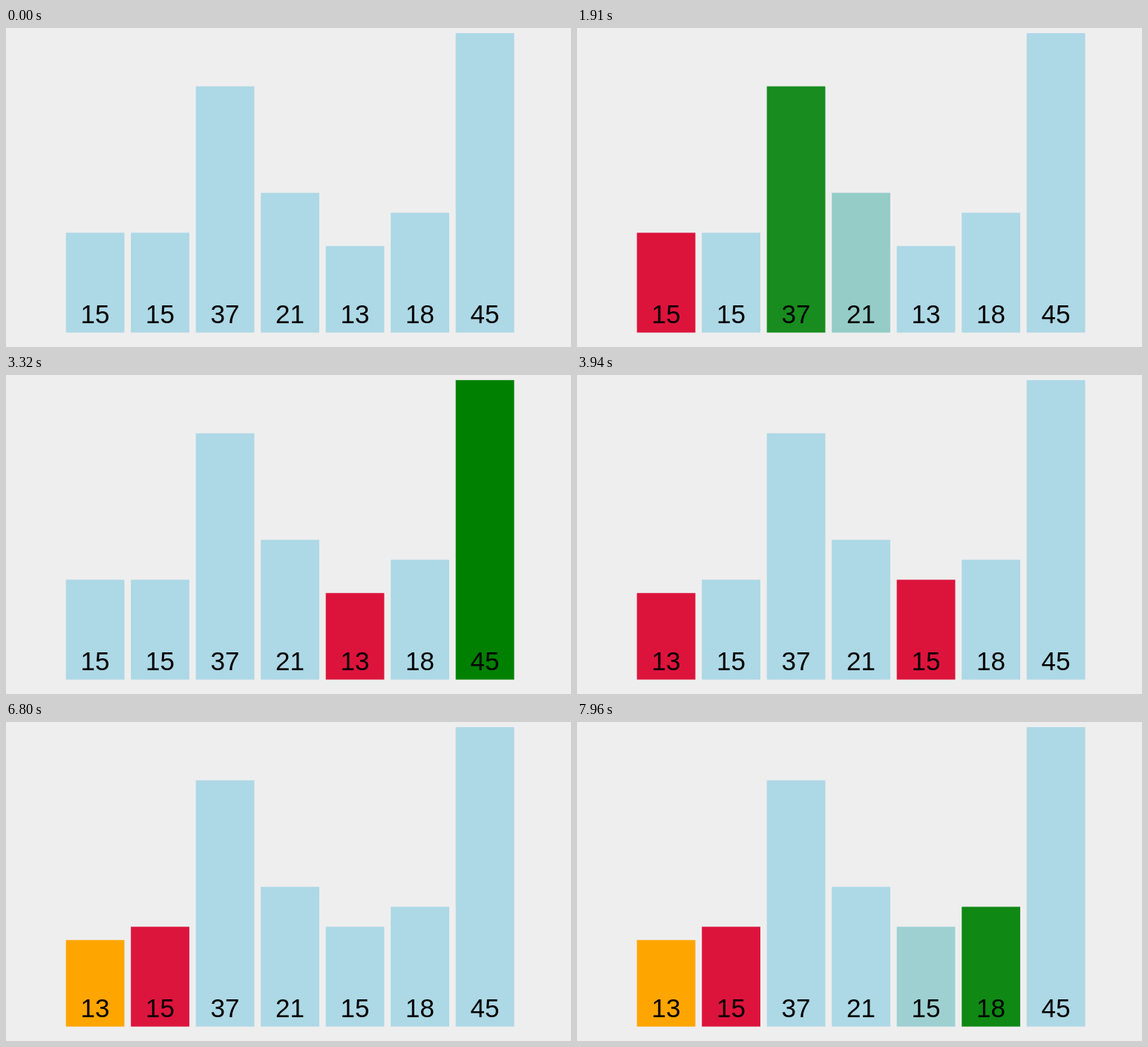
An HTML page that plays this animation: 761x429 px, repeating every 8 s.

```html
<!DOCTYPE html>
<html lang="en">
<head>
<meta charset="utf-8">
<title>Selection sort</title>
<style>
  html, body { margin: 0; width: 100%; height: 100%; overflow: hidden; background: #eee; }
  svg { display: block; width: 761px; height: 429px; }
  text { font: 35px "Liberation Sans", Arial, sans-serif; text-anchor: middle; }
</style>
</head>
<body>
<svg id="stage" viewBox="0 0 761 429"></svg>
<script>
const LOOP = 8000, FADE = 250;
const LEFT = 80.7, PITCH = 87.5, WIDTH = 78.75, BASE = 409.6, UNIT = 8.95;

const IDLE = [173, 216, 230];
const LOOK = [0, 128, 0];
const MIN = [220, 20, 60];
const DONE = [255, 165, 0];

const values = [15, 15, 37, 21, 13, 18, 45];

// Each cue: start time, then pairs of bar index and new colour.
const colourCues = [
  [825, 0, MIN],
  [1035, 1, LOOK],
  [1555, 1, IDLE, 2, LOOK],
  [1830, 2, IDLE, 3, LOOK],
  [2095, 3, IDLE, 4, LOOK],
  [2345, 0, IDLE, 4, MIN],
  [2685, 5, LOOK],
  [3090, 5, IDLE, 6, LOOK],
  [3395, 6, IDLE, 0, MIN],
  [5759, 4, DONE, 0, IDLE],
  [6580, 1, MIN],
  [7159, 2, LOOK],
  [7324, 2, IDLE, 3, LOOK],
  [7553, 3, IDLE, 0, LOOK],
  [7781, 0, IDLE, 5, LOOK]
];
const SWAP = { time: 3670, a: 0, b: 4 };

const stage = document.getElementById('stage');

function add(parent, tag, attrs) {
  const el = document.createElementNS('http://www.w3.org/2000/svg', tag);
  for (const key in attrs) el.setAttribute(key, attrs[key]);
  return parent.appendChild(el);
}

const bars = values.map((value, i) => {
  const group = add(stage, 'g', {});
  const height = value * UNIT;
  const rect = add(group, 'rect', { y: BASE - height, width: WIDTH, height });
  add(group, 'text', { x: WIDTH / 2, y: 396.5 }).textContent = value;
  return { group, rect, slot: i, cues: [] };
});

for (const [time, ...pairs] of colourCues) {
  for (let i = 0; i < pairs.length; i += 2) {
    bars[pairs[i]].cues.push({ time, to: pairs[i + 1] });
  }
}

const ease = t => t < 0.5 ? 4 * t ** 3 : 1 - 4 * (1 - t) ** 3;
const progress = (t, start) => ease(Math.min(1, Math.max(0, (t - start) / FADE)));
const mix = (a, b, p) => a + (b - a) * p;

// A new fade takes over from wherever the previous one has got to.
function colourAt(cues, t) {
  let from = IDLE;
  for (let i = 0; i < cues.length && cues[i].time <= t; i++) {
    const end = Math.min(t, i + 1 < cues.length ? cues[i + 1].time : LOOP);
    const p = progress(end, cues[i].time);
    from = from.map((c, k) => mix(c, cues[i].to[k], p));
  }
  return from;
}

function slotAt(bar, t) {
  const p = progress(t, SWAP.time);
  if (bar.slot === SWAP.a) return mix(SWAP.a, SWAP.b, p);
  if (bar.slot === SWAP.b) return mix(SWAP.b, SWAP.a, p);
  return bar.slot;
}

function draw(t) {
  for (const bar of bars) {
    const x = LEFT + PITCH * slotAt(bar, t);
    bar.group.setAttribute('transform', `translate(${x} 0)`);
    bar.rect.setAttribute('fill', `rgb(${colourAt(bar.cues, t).map(Math.round)})`);
  }
}

const begin = performance.now();
function tick() {
  draw((performance.now() - begin) % LOOP);
  requestAnimationFrame(tick);
}
tick();
</script>
</body>
</html>
```
